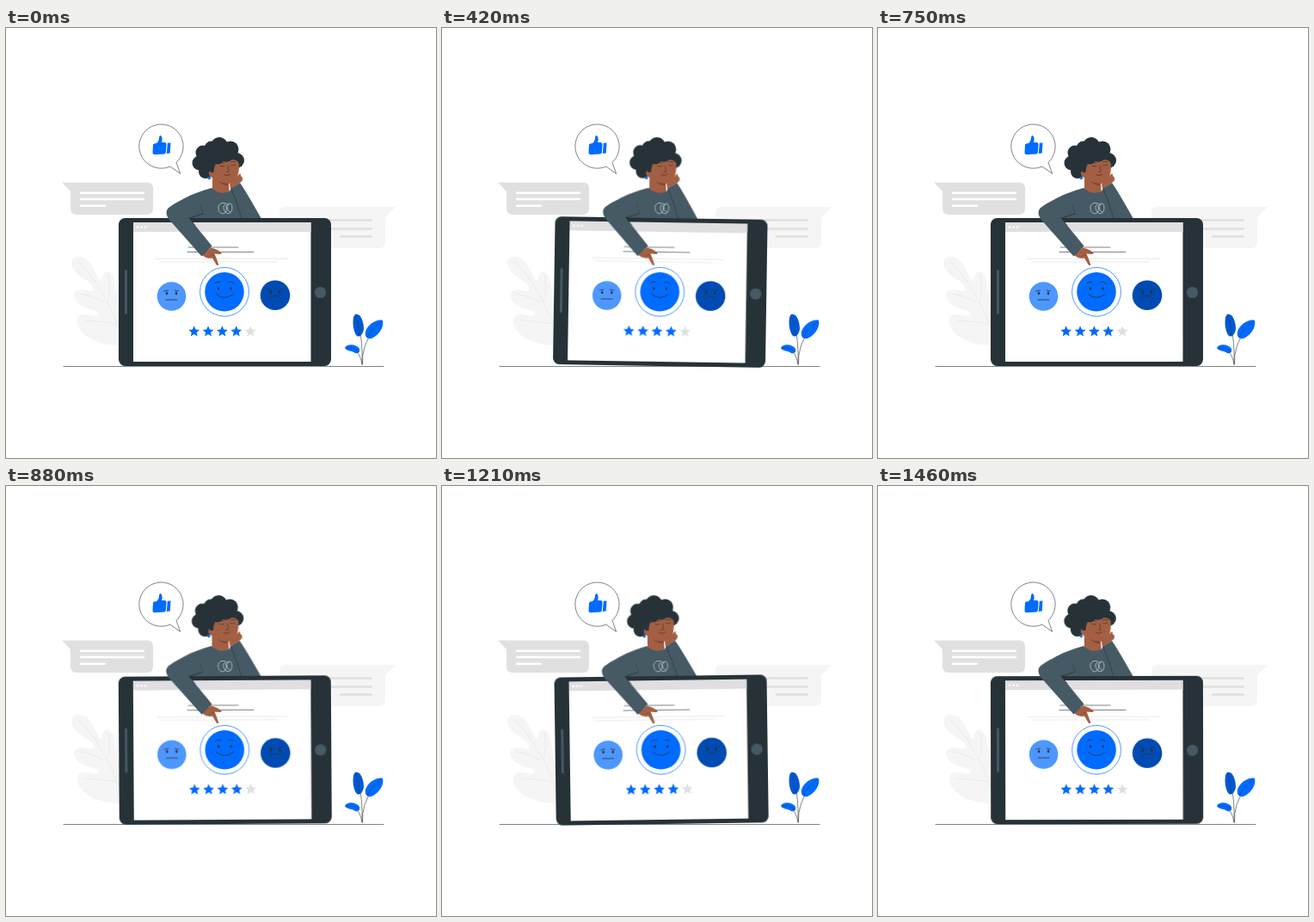
Write an HTML page that moves like this. It is 500x500 px and loops after 1.5 s.

```html
<!DOCTYPE html>
<html lang="en">
<head>
<meta charset="utf-8">
<title>Rating</title>
<style>
  html, body { margin: 0; width: 100%; height: 100%; overflow: hidden; background: #fff; }
  svg { display: block; width: 100%; height: 100%; }
  .ink { fill: #263238; }
  .line { fill: none; stroke: #263238; stroke-width: .6; stroke-linecap: round; stroke-linejoin: round; }
  .blue { fill: #006bff; }
  .slate { fill: #455a64; }
  .skin { fill: #a35f43; }
  .pale { fill: #f5f5f5; }
  .vein { fill: none; stroke: #e4e4e4; stroke-width: .7; }
  .bars { fill: none; stroke-width: 2.4; stroke-linecap: round; }
  #sway { transform-origin: 254px 260px; animation: sway 1.5s linear infinite; }
  @keyframes sway {
    0%, 100% { transform: rotate(0deg); }
    25% { transform: rotate(1deg); }
    75% { transform: rotate(-1deg); }
  }
</style>
</head>
<body>
<svg viewBox="0 0 500 500">
  <!-- ground -->
  <path class="line" d="M67 393.5H439"/>

  <!-- pale plant -->
  <g class="pale">
    <path d="M76 273C77 264 90 263 97 272C102 279 104 285 108 292C111 297 112 290 113 286C116 281 122 283 125 290L133 330V369C112 369 90 362 84 346C80 334 88 331 99 334C106 336 110 333 106 329C96 327 80 322 79 311C80 302 92 304 98 306C104 307 102 299 96 295C86 289 77 283 76 273Z"/>
  </g>
  <path class="vein" d="M84 272Q108 292 132 350M86 309Q103 312 114 319M92 340Q112 341 128 344M119 287Q122 305 118 318"/>

  <!-- message boxes -->
  <path fill="#e0e0e0" d="M65 179.5H164Q171 179.5 171 186.500V210Q171 217 164 217H82Q75 217 75 210V190Z"/>
  <path class="bars" stroke="#fff" d="M87 191.800H160M87 199H160M87 206.700H115"/>
  <path class="pale" d="M453 208H325Q318 208 318 215V249Q318 256 325 256H434Q441 256 441 249V220Z"/>
  <path class="bars" stroke="#e0e0e0" d="M350 223.500H425M350 233.500H425M389 242.500H425"/>

  <!-- speech bubble -->
  <path class="line" style="fill:#fff" d="M190.500 161.200A25.600 25.600 0 1 1 198 156.300L202.500 169Z"/>
  <g class="blue">
    <path d="M171 135.500Q172 134 175 134Q178 132 178 127Q179 124 180.500 125.500Q182.500 128 181 133H185Q187 134 186.500 136L185.800 145Q185.500 146.300 184 146.500L172.500 147.200Q170.500 147 170.500 145Z"/>
    <path d="M187.800 133.800L191.500 133.400L190.700 145.600L186.800 146Z"/>
  </g>

  <!-- blue plant -->
  <path class="line" d="M414 391Q415 365 410 344M414.500 391Q413 370 428 350M414 391Q412 376 402 373"/>
  <path fill="#0058d2" d="M406 333C412 331 416 341 416 350C415 356 412 360 408 358C403 353 402 336 406 333Z"/>
  <path class="blue" d="M438 340C440 347 434 357 425 361C419 362 417 358 418 353C421 344 432 338 438 340Z"/>
  <path class="blue" d="M394 372C396 367 407 367 411 373C412 377 409 379 406 378C402 375 396 376 394 372Z"/>
  <path class="line" style="stroke-width:.4" d="M407 336Q411 346 410.500 358M436 342Q425 349 420 360M396 372Q406 371 411 377"/>

  <g id="sway">
    <!-- head -->
    <g class="ink" id="hair"></g>
    <path class="skin" d="M238 166C235 166 235 173 240 174L240 192Q249 199 260 192L259 181Q268 180 270 170Q272 160 270 152Q256 147 242 157Z"/>
    <path fill="#854730" d="M247 178Q252 181 259 180.500L258 183Q251 183 247 178Z"/>
    <path class="ink" d="M238 168Q234 156 242 148Q256 140 270 149Q275 153 271 157Q268 153 263 153Q258 157 253 155Q248 160 244 158Q242 161 241.500 168Z"/>
    <path class="line" d="M249 160.500Q251 162 254 160.500M262 159.500Q264.500 161 267 159M248.500 157.500Q251 155.500 254 157M261.500 156Q264 154.500 267 155.500M258 160L259 167L256.500 167.500"/>
    <path d="M253 170Q257 173 261 169.500" fill="none" stroke="#7c3328" stroke-width="1"/>
    <circle class="blue" cx="236.500" cy="174.500" r="1.700"/>

    <!-- sweater and propped hand -->
    <path class="slate" d="M239 186Q249 195 260 190L262 186L272 180Q278 188 297 222H212L190 216Q188 209 197 204Q216 192 239 186Z"/>
    <path class="skin" d="M261 187L260 181Q262 178 266 177L271 170Q273 168 273 172L275 174Q276 177 272 180Z"/>
    <path class="line" d="M262 187Q269 204 274 221M225 205L229 216L214 221"/>
    <path class="line" style="stroke:#e8edf0" d="M259 206Q251 200 247 207C246 215 253 219 256 213C258 207 254 203 253 208C253 217 263 219 263 209C263 202 257 203 257 208Q257 213 261 214"/>

    <!-- tablet -->
    <rect class="ink" x="131" y="221" width="247" height="172" rx="7.500"/>
    <rect x="148" y="226" width="206.500" height="162" fill="#fff"/>
    <rect x="148" y="226" width="206.500" height="11" fill="#e0dee0"/>
    <g fill="#fff">
      <circle cx="153" cy="231.500" r="1.300"/><circle cx="157.600" cy="231.500" r="1.300"/><circle cx="162.200" cy="231.500" r="1.300"/>
    </g>
    <circle class="slate" cx="365.500" cy="307.500" r="6.600"/>
    <rect class="slate" x="138" y="281" width="2.800" height="52" rx="1.400"/>
    <path class="line" d="M212 255H270M211 260.500H288"/>
    <path class="line" style="stroke:#dcdcdc" d="M174 268.300H328M178 272H315"/>

    <!-- faces -->
    <circle cx="192.500" cy="312" r="16.800" fill="#4d97ff"/>
    <circle cx="313" cy="310.800" r="17.300" fill="#004bb3"/>
    <circle cx="254" cy="306.800" r="28.400" fill="none" stroke="#006bff" stroke-width=".7"/>
    <circle class="blue" cx="254" cy="306.800" r="22.800"/>
    <path class="line" style="stroke-width:.8" d="M186 316H199M184 306L188.500 305M196 305L200.500 306M244.500 309.500Q254 317.500 264 309.500M243.500 296.500Q246 294 249 295.500M259 295.500Q262 294 264.500 296.500M306.500 314.500Q313 307.500 319.500 314.500M304.500 303.500L309.500 305.500M316.500 305.500L321.500 303.500"/>
    <g class="ink" id="eyes"></g>
    <g id="stars"></g>

    <!-- pointing arm -->
    <path class="skin" d="M228 263L238 255.500Q246 257 250.500 261.500Q251 263.300 248.500 263L242.500 262.500Q245 268 247.200 275Q246.500 277.300 244.800 275.500L240 267.500Q234 269 228 264Z"/>
    <path class="line" style="stroke:#7c422e" d="M236 267L239 263.500L242.500 265"/>
    <path class="slate" d="M225 205L229 216L213 221L239.500 253.500L227.500 265.500L189 222Q184 214 189 209Q203 198 225 195Z"/>
    <path class="line" d="M229 216L213 221L220 229.500"/>
  </g>
</svg>
<script>
  const NS = 'http://www.w3.org/2000/svg';
  const add = (id, tag, attrs) => {
    const el = document.createElementNS(NS, tag);
    for (const key in attrs) el.setAttribute(key, attrs[key]);
    document.getElementById(id).append(el);
  };

  const curls = [
    [225, 157, 8.5], [229, 145, 8.5], [239, 140, 8.5], [248, 137, 10], [261, 141, 9.5],
    [268, 154, 9], [232, 167, 8], [240, 153, 13], [255, 150, 12]
  ];
  for (const [cx, cy, r] of curls) add('hair', 'circle', { cx, cy, r });

  const eyes = [[187, 308.5], [198, 308.5], [247, 303], [261.500, 303], [308, 307.5], [318, 307.5]];
  for (const [cx, cy] of eyes) add('eyes', 'ellipse', { cx, cy, rx: 1.2, ry: 1.8 });

  const star = (x, y) => Array.from({ length: 10 }, (_, i) => {
    const r = i % 2 ? 3.1 : 6.7, a = i * Math.PI / 5;
    return [x + r * Math.sin(a), y - r * Math.cos(a)].map(n => n.toFixed(2)).join();
  }).join(' ');
  for (let i = 0; i < 5; i++) {
    add('stars', 'polygon', { points: star(218.7 + i * 16.35, 353), fill: i < 4 ? '#006bff' : '#e0e0e0' });
  }
</script>
</body>
</html>
```
